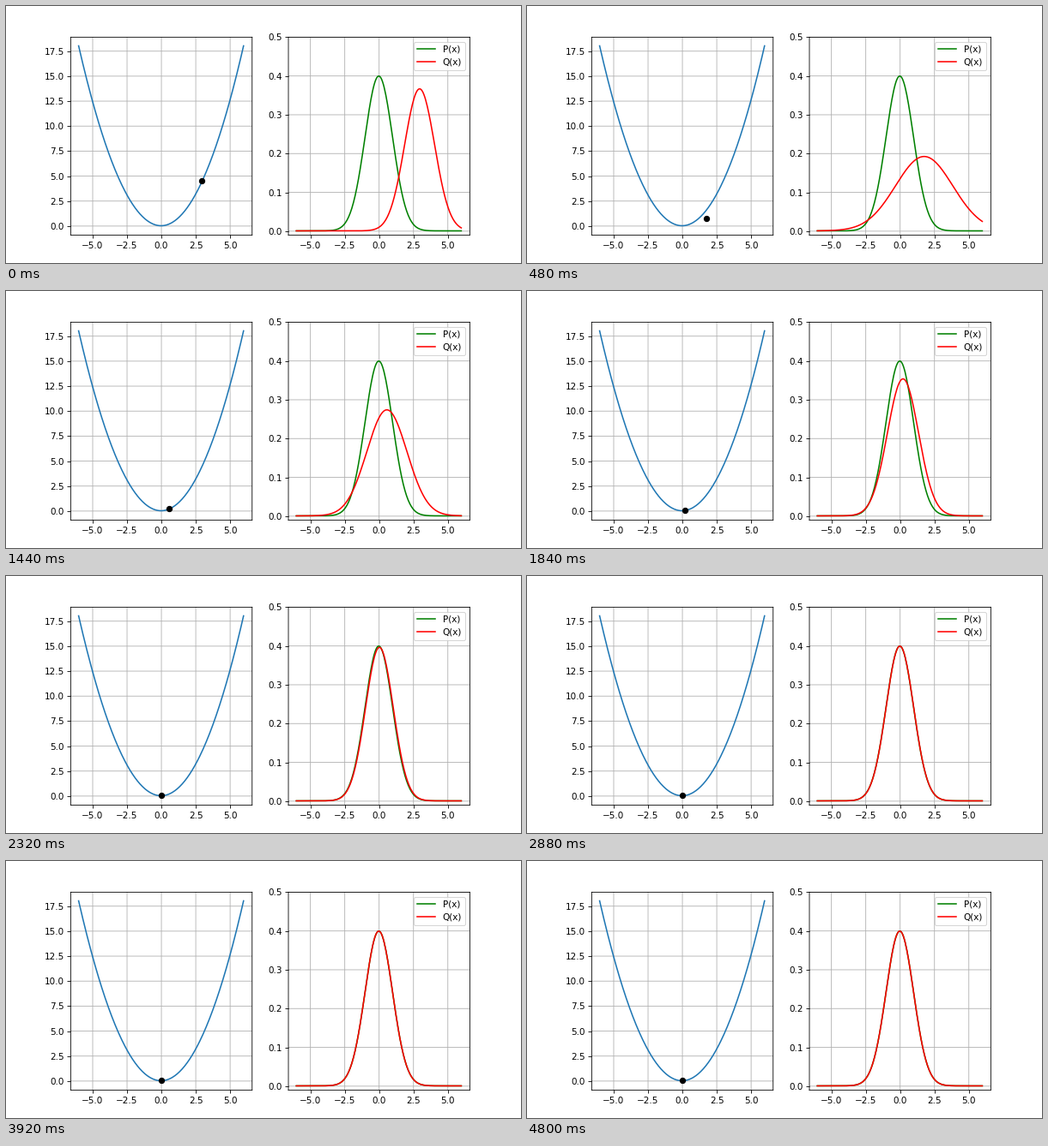
Animation, 600 px wide and 300 px high, one loop 6.48 s. Source, as a matplotlib script:

```python
import numpy as np
import matplotlib.pyplot as plt
from matplotlib.animation import FuncAnimation
from matplotlib.transforms import Affine2D

WIDTH, HEIGHT, DPI = 600, 300, 75
FRAMES = 81
INTERVAL = 80
STEPS_PER_FRAME = 30
RATE = 0.01
NUDGE = 0.375  # pixels by which the axes box sits right of and below the curves


def normal(x, mu, sigma):
    return np.exp(-0.5 * ((x - mu) / sigma) ** 2) / (sigma * np.sqrt(2 * np.pi))


def divergence(mu, sigma):
    """KL(P || Q) with P = N(0, 1) and Q = N(mu, sigma)."""
    return np.log(sigma) + (1 + mu ** 2) / (2 * sigma ** 2) - 0.5


def descend():
    """Gradient descent on the divergence, sampled once per frame."""
    mu, sigma = 3.0, 1.0
    states = []
    for step in range(FRAMES * STEPS_PER_FRAME):
        cost = divergence(mu, sigma)
        grad_mu = mu / sigma ** 2
        grad_sigma = 1 / sigma - (1 + mu ** 2) / sigma ** 3
        mu -= RATE * grad_mu
        sigma -= RATE * grad_sigma
        if step % STEPS_PER_FRAME == 0:
            states.append((mu, sigma, cost))
    return states


def style(ax):
    ax.set_xlim(-6.6, 6.6)
    ax.set_xticks(np.arange(-5, 6, 2.5))
    ax.grid(True)
    plt.setp(ax.get_xgridlines() + ax.get_ygridlines(), snap=False)
    plt.setp(list(ax.spines.values()), snap=False)


def curve(ax, xs, ys, *fmt, **kwargs):
    shift = Affine2D().translate(-NUDGE, NUDGE)
    line, = ax.plot(xs, ys, *fmt, transform=ax.transData + shift, **kwargs)
    return line


states = descend()
x = np.linspace(-6, 6, 200)

fig, (left, right) = plt.subplots(1, 2, figsize=(WIDTH / DPI, HEIGHT / DPI), dpi=DPI)
dx, dy = NUDGE / WIDTH, NUDGE / HEIGHT
fig.subplots_adjust(left=0.125 + dx, right=0.9 + dx,
                    bottom=0.11 - dy, top=0.88 - dy, wspace=0.2)

curve(left, x, x ** 2 / 2, color="#1f77b4")
dot = curve(left, [], [], "ko")
left.set_ylim(-0.9, 18.9)
left.set_yticks(np.arange(0, 18, 2.5))

curve(right, x, normal(x, 0, 1), color="green", label="P(x)")
q_line = curve(right, [], [], color="red", label="Q(x)")
right.set_ylim(-0.01, 0.5)
right.set_yticks(np.arange(6) / 10)
right.legend(loc="upper right")

style(left)
style(right)


def update(frame):
    mu, sigma, cost = states[frame]
    dot.set_data([mu], [cost])
    q_line.set_data(x, normal(x, mu, sigma))
    return dot, q_line


anim = FuncAnimation(fig, update, frames=FRAMES, interval=INTERVAL,
                     init_func=lambda: update(0), repeat=True, repeat_delay=0)
plt.show()
```
